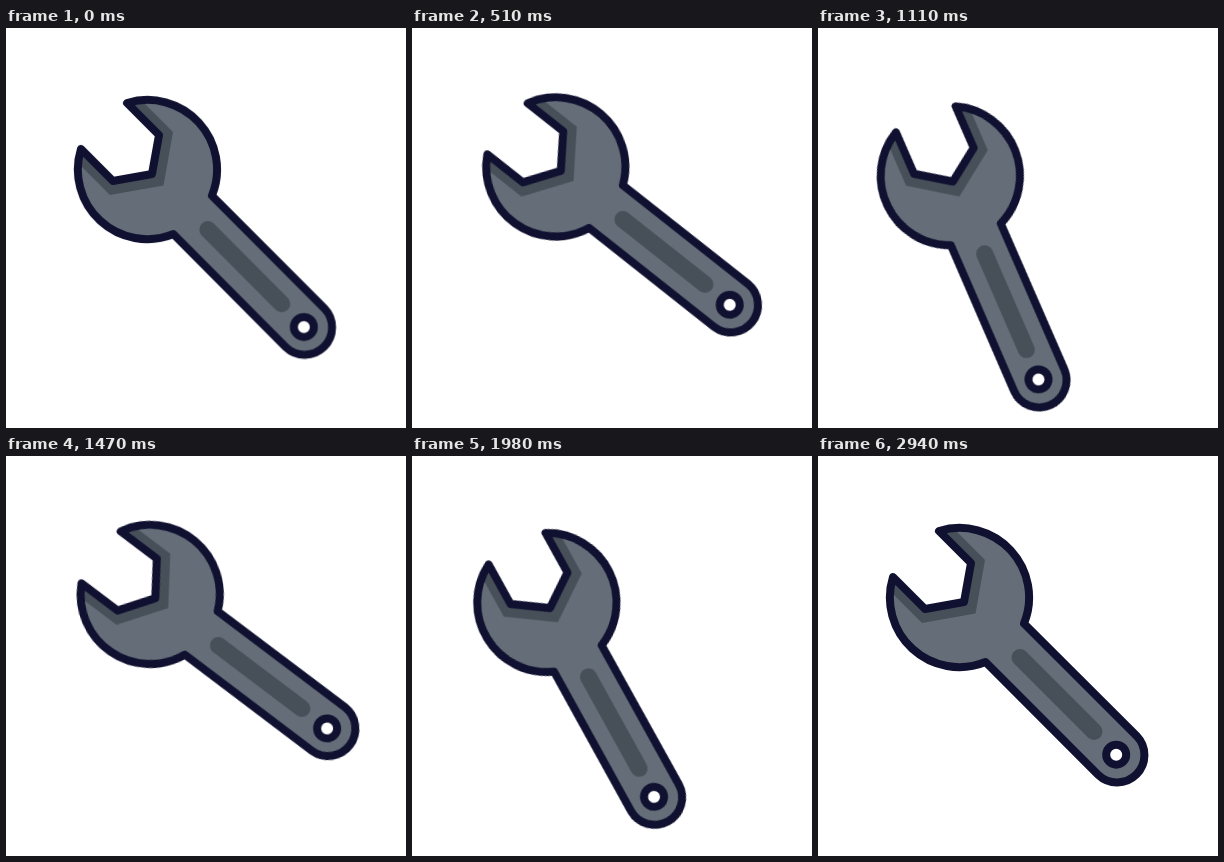
An HTML page without scripts for the animation above (4970 ms loop, 400 by 400 pixels).

```html
<!DOCTYPE html>
<html lang="en">
<head>
<meta charset="utf-8">
<title>Wrench</title>
<style>
  html, body { margin: 0; width: 100%; height: 100%; overflow: hidden; background: #fff; }
  svg { display: block; width: 100%; height: 100%; }

  .wrench {
    transform-origin: 120.5px 120.5px;
    animation: turn 4970ms infinite;
  }
  .outline { stroke: #101130; stroke-width: 8; stroke-linejoin: round; }
  .metal { fill: #656e78; }
  .shade { fill: #474f59; }
  .slot { stroke: #474f59; stroke-width: 17; stroke-linecap: round; }

  /* Three swings about the jaw, then a rest */
  @keyframes turn {
    0%     { transform: rotate(0deg); animation-timing-function: cubic-bezier(.3, .2, .6, 1); }
    2.85%  { transform: rotate(22.2deg); animation-timing-function: cubic-bezier(.37, 0, .63, 1); }
    12.25% { transform: rotate(-10deg); animation-timing-function: cubic-bezier(.37, 0, .63, 1); }
    21.43% { transform: rotate(22.2deg); animation-timing-function: cubic-bezier(.37, 0, .63, 1); }
    31.2%  { transform: rotate(-10deg); }
    33.02% { transform: rotate(-10deg); animation-timing-function: cubic-bezier(.4, 0, .75, .9); }
    41.57% { transform: rotate(22.2deg); animation-timing-function: cubic-bezier(.3, .15, .4, 1); }
    50.1%  { transform: rotate(-10deg); animation-timing-function: ease; }
    59.15%, 100% { transform: rotate(0deg); }
  }
</style>
</head>
<body>
<svg viewBox="0 0 400 400">
  <defs>
    <path id="body" d="M121 75A69.5 69.5 0 0 1 206 167.5L318.8 280.2A27.3 27.3 0 0 1 280.2 318.8L167.5 206A69.5 69.5 0 0 1 75 121L107 153L146 146L153 107Z"/>
  </defs>
  <g class="wrench">
    <use href="#body" class="metal"/>
    <path class="shade" d="M121 75L135 72L167 104L157.5 157.5L104 167L72 135L75 121L107 153L146 146L153 107Z"/>
    <path class="slot" d="M202 201.5L276 275.5"/>
    <use href="#body" class="outline" fill="none"/>
    <circle class="outline" cx="298.2" cy="298.7" r="10" fill="#fff"/>
  </g>
</svg>
</body>
</html>
```
